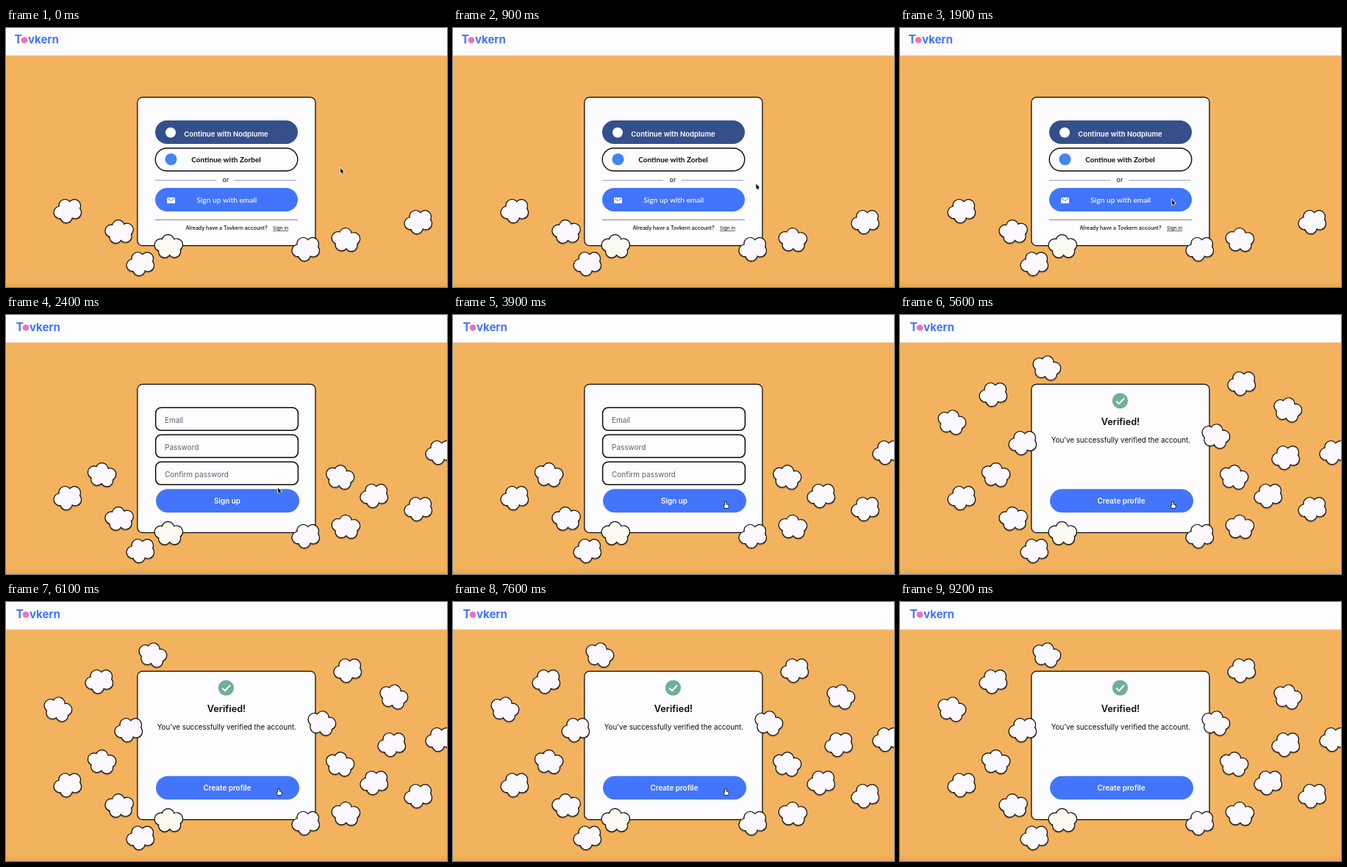
Recreate the animation shown at these times as an HTML page with a canvas. Size 600 px wide and 353 px high, loop 9300 ms.

```html
<!DOCTYPE html>
<html lang="en">
<head>
<meta charset="utf-8">
<style>
  html, body { margin: 0; width: 600px; height: 353px; overflow: hidden; background: #f3b25d; }
  canvas { display: block; width: 600px; height: 353px; }
</style>
</head>
<body>
<canvas id="stage"></canvas>
<script>
const LOOP = 9300;
const SCREEN_STARTS = [0, 2000, 4200, 5600];
const WHITE = '#fdfcfe', INK = '#0b0b0f', BLUE = '#4275fb', ORANGE = '#f3b25d';
const SANS = 'Inter, "Open Sans", sans-serif';
const HUMANIST = 'Lato, "Open Sans", sans-serif';

// Cloud centres, in the order they pile up
const FIRST_CLOUDS = 7, CLOUDS_PER_SCREEN = 4, CREAM_CLOUD = 3;
const CLOUDS = [
  [84, 249], [154, 278], [183, 321], [221, 298], [408, 301], [462, 289], [561, 264],
  [130, 218], [501, 246], [454, 221], [590, 187],
  [70, 146], [167, 174], [429, 165], [525, 194],
  [199, 72], [127, 108], [527, 129], [465, 93]
];

const canvas = document.getElementById('stage');
const scale = Math.max(1, window.devicePixelRatio || 1);
canvas.width = 600 * scale;
canvas.height = 353 * scale;
const ctx = canvas.getContext('2d');

function at(x, y, turn, paint) {
  ctx.save();
  ctx.translate(x, y);
  ctx.rotate(turn);
  paint();
  ctx.restore();
}

function text(str, x, y, size, { weight = 400, color = INK, align = 'center', font = SANS } = {}) {
  ctx.font = `${weight} ${size}px ${font}`;
  ctx.textAlign = align;
  ctx.fillStyle = color;
  ctx.fillText(str, x, y);
}

function paintPath(fill, stroke, width) {
  if (fill) {
    ctx.fillStyle = fill;
    ctx.fill();
  }
  if (stroke) {
    ctx.strokeStyle = stroke;
    ctx.lineWidth = width;
    ctx.stroke();
  }
}

function box(x, y, w, h, r, fill, width = 0, stroke = INK) {
  ctx.beginPath();
  ctx.roundRect(x, y, w, h, r);
  paintPath(fill, width && stroke, width);
}

function dot(x, y, r, fill) {
  ctx.beginPath();
  ctx.arc(x, y, r, 0, Math.PI * 2);
  paintPath(fill);
}

function line(points, stroke, width = 1) {
  ctx.beginPath();
  points.forEach(([x, y]) => ctx.lineTo(x, y));
  paintPath(null, stroke, width);
}

function rule(x1, x2, y, color, width = 1) {
  line([[x1, y], [x2, y]], color, width);
}

// Five equal lobes spaced around an ellipse
function puff(grow, fill) {
  dot(0, 0, 10, fill);
  for (let i = 0; i < 5; i++) {
    const angle = (i * 72 - 100) * Math.PI / 180;
    dot(0.6 + 11.5 * Math.cos(angle), 8 * Math.sin(angle), 8.4 + grow, fill);
  }
}

function cloud(i) {
  const [x, y] = CLOUDS[i];
  const turn = (i % 2 ? Math.min(2 * i, 22) : -18) * Math.PI / 180;
  at(x, y + 1.4, turn, () => puff(0.6, 'rgba(70, 42, 12, .3)'));
  at(x, y, turn, () => {
    puff(0.6, INK);
    puff(-0.6, i === CREAM_CLOUD ? '#fbfaf1' : '#fbf9fe');
  });
}

function clouds(from, to) {
  for (let i = from; i < to; i++) cloud(i);
}

function logo() {
  const style = { weight: 700, color: BLUE, align: 'left' };
  text('T', 11.5, 21, 15.5, style);
  dot(25, 16.5, 4.3, '#ef70bd');
  text('vkern', 30, 21, 15, style);
}

function mainButton(label) {
  box(204, 237.2, 195, 32, 16, BLUE);
  text(label, 301, 256.8, 9.9, { weight: 600, color: '#fff' });
}

function welcome() {
  box(203, 126, 194, 32, 16, '#354f8b');
  dot(224, 142.5, 7, '#fff');
  text('Continue with Nodplume', 299.5, 147.5, 9.6, { weight: 600, color: '#fff' });

  box(203.2, 163.7, 193.6, 31, 15.5, WHITE, 1.4);
  dot(224.5, 179, 8, '#4285f4');
  text('Continue with Zorbel', 299.5, 183, 10, { weight: 700, font: HUMANIST });

  rule(203, 286, 207.5, '#a7a5b0');
  rule(311, 395, 207.5, '#a7a5b0');
  text('or', 299, 210, 9);

  box(203, 218, 194, 32, 16, BLUE);
  box(219, 231, 11, 8, 1, '#fff');
  line([[219.8, 232.3], [224.5, 235.5], [229.2, 232.3]], BLUE);
  text('Sign up with email', 300.3, 238.3, 10.2, { weight: 500, color: '#fff', font: HUMANIST });

  rule(203, 397, 261.5, '#85838b');
  text('Already have a Tovkern account?', 300, 275, 7, { weight: 500 });
  text('Sign in', 373.5, 275, 6.6);
  rule(363, 384, 276.5, INK, 0.6);
}

function signUp() {
  ['Email', 'Password', 'Confirm password'].forEach((label, i) => {
    const y = 126.3 + i * 37;
    box(203.6, y, 193.8, 31, 7.5, WHITE, 1.5);
    text(label, 216, y + 20.6, 10, { color: '#626168', align: 'left' });
  });
  mainButton('Sign up');
}

function letterInHand() {
  at(285, 117.5, 0.02, () => {
    box(0, -7.5, 61.5, 16, 2, '#4b84f2');
    for (let x = 8; x < 60; x += 10) line([[x, -7], [x + 2, 0], [x, 8]], '#9cc4fa', 1.6);
  });
  box(267, 111.5, 18, 12, 5, '#e9b982', 0.6, '#a87846');
  at(258, 116.3, -0.16, () => {
    box(-12.5, -8.7, 25, 17.4, 1, '#f6b9df', 1, '#d464ac');
    line([[-12.5, -8.7], [0, 0.5], [12.5, -8.7]], '#d464ac');
  });
  box(265, 115, 9, 2.8, 1.4, '#e9b982');
}

function verify() {
  letterInHand();
  text('Verify your email.', 300.3, 149.3, 12.6, { weight: 600 });
  text('Please enter the 4 digit code sent to uvw@mailer.test', 300, 172.7, 9.2);
  for (let i = 0; i < 4; i++) box(237.5 + i * 34, 188.3, 23.6, 23.6, 2.8, WHITE, 1.4);
  text('Resend code', 298.5, 229.3, 6.8, { weight: 500, color: BLUE });
  mainButton('Confirm');
  text('Change email', 299.5, 286.4, 7.1, { weight: 500 });
  rule(276, 323, 288, INK, 0.7);
}

function verified() {
  dot(299.5, 117, 10.6, '#6fb098');
  line([[294.3, 117.5], [298, 121], [305, 113.5]], '#fff', 2);
  text('Verified!', 300, 149.9, 12.7, { weight: 600 });
  text('You’ve successfully verified the account.', 300.3, 173.8, 9.75);
  mainButton('Create profile');
}

const SCREENS = [welcome, signUp, verify, verified];

function ease(t, from, to) {
  const p = Math.min(1, Math.max(0, (t - from) / (to - from)));
  return p * p * (3 - 2 * p);
}

function arrow() {
  ctx.beginPath();
  ctx.moveTo(0, 0);
  ctx.lineTo(0, 6.6);
  ctx.lineTo(4.7, 4.7);
  ctx.closePath();
  paintPath(null, '#fff', 1.6);
  line([[1.8, 4.5], [3.2, 7.6]], '#fff', 2.6);
  paintPath(null, INK, 1.3);
  ctx.beginPath();
  ctx.moveTo(0, 0);
  ctx.lineTo(0, 6.6);
  ctx.lineTo(4.7, 4.7);
  paintPath(INK);
}

function hand() {
  const shape = grow => {
    const fill = grow ? INK : '#fff';
    box(-0.8 - grow, -grow, 1.6 + 2 * grow, 6 + 2 * grow, 0.8, fill);
    box(-1.8 - grow, 3.6 - grow, 5.6 + 2 * grow, 4.4 + 2 * grow, 1.6, fill);
  };
  shape(0.7);
  shape(0);
}

function cursor(t) {
  const toButton = ease(t, 300, 1500);
  const down = ease(t, 2300, 2900);
  const x = 455 - 85 * toButton + down;
  const y = 191 + 43 * toButton + 21 * down - 275 * ease(t, 8000, 8700);
  const overButton = t > SCREEN_STARTS[1] && y > 237;
  at(x, y, 0, overButton ? hand : arrow);
}

function background() {
  ctx.fillStyle = ORANGE;
  ctx.fillRect(0, 0, 600, 353);
  const shade = ctx.createLinearGradient(0, 344, 0, 353);
  shade.addColorStop(0, 'rgba(90, 50, 0, 0)');
  shade.addColorStop(1, 'rgba(90, 50, 0, .08)');
  ctx.fillStyle = shade;
  ctx.fillRect(0, 344, 600, 9);
  ctx.fillStyle = WHITE;
  ctx.fillRect(0, 0, 600, 37.5);
}

function draw(t) {
  const screen = SCREEN_STARTS.filter(start => t >= start).length - 1;
  const total = FIRST_CLOUDS + CLOUDS_PER_SCREEN * screen;
  // The verify screen's new clouds start out behind the card.
  const inFront = SCREENS[screen] === verify ? total - CLOUDS_PER_SCREEN : total;

  ctx.setTransform(scale, 0, 0, scale, 0, 0);
  background();
  at(screen ? 2 : 0, screen ? 0.8 : 0, 0, logo);
  clouds(inFront, total);
  box(178.8, 94.3, 242.2, 202.4, 7, WHITE, 1.3);
  SCREENS[screen]();
  clouds(0, inFront);
  cursor(t);
}

const start = performance.now();
function tick() {
  draw((performance.now() - start) % LOOP);
  requestAnimationFrame(tick);
}
tick();
</script>
</body>
</html>
```
